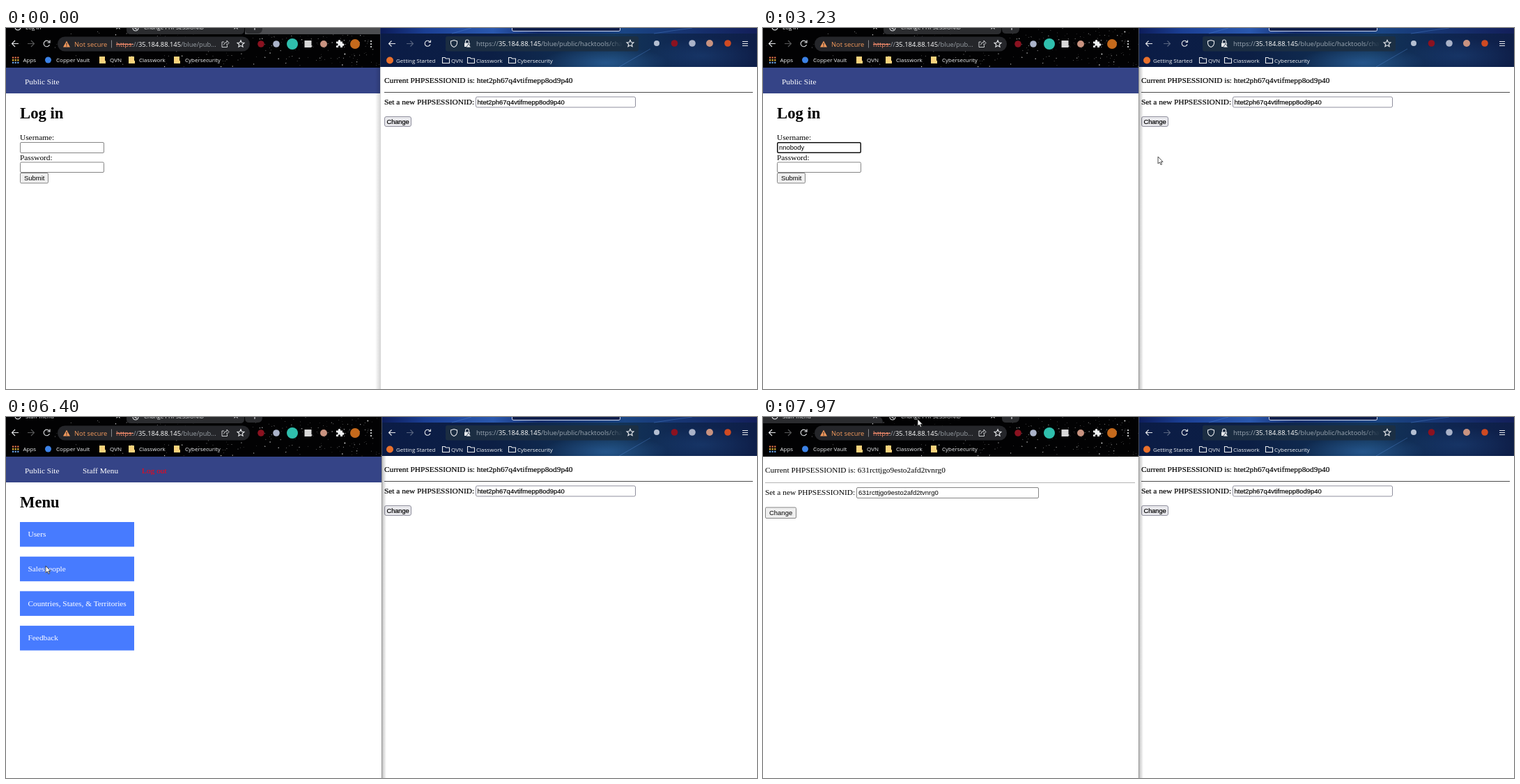
An HTML page for the animation above (8000 ms loop, 1078 by 519 pixels).

```html
<!DOCTYPE html>
<html lang="en">
<head>
<meta charset="utf-8">
<title>Session demo</title>
<style>
html, body { margin: 0; width: 100%; height: 100%; overflow: hidden; background: #fff; }
svg { display: block; width: 100vw; height: 100vh; }
text { white-space: pre; }
.ui { font: 8px "Open Sans", "Noto Sans", sans-serif; fill: #f1f3f4; }
.url { font-size: 9.4px; }
.page { font: 11.36px "Liberation Serif", serif; }
.h1 { font: bold 22.7px "Liberation Serif", serif; }
.form { font: 9.47px "Liberation Sans", sans-serif; }
.crisp { stroke: #000; stroke-width: .2; }
.line { fill: none; stroke: #e8eaed; stroke-width: 1.1; }
.box { fill: #fff; stroke: #858585; }
</style>
</head>
<body>
<svg viewBox="0 0 1078 519" preserveAspectRatio="none">
  <defs>
    <clipPath id="leftClip"><rect id="leftArea" width="537" height="519"/></clipPath>
    <clipPath id="rightHead"><rect x="537" width="541" height="56"/></clipPath>
    <linearGradient id="shade"><stop stop-color="#000" stop-opacity="0"/><stop offset="1" stop-color="#000" stop-opacity=".28"/></linearGradient>
    <linearGradient id="sky"><stop stop-color="#0b1c46"/><stop offset=".3" stop-color="#0c1f45"/><stop offset=".62" stop-color="#133558"/><stop offset=".8" stop-color="#0f2752"/><stop offset="1" stop-color="#0e1e48"/></linearGradient>
    <linearGradient id="strip"><stop stop-color="#0d1c58"/><stop offset=".12" stop-color="#1b3f94"/><stop offset=".3" stop-color="#2a58ae"/><stop offset=".42" stop-color="#142c6c"/><stop offset=".65" stop-color="#1a4584"/><stop offset="1" stop-color="#131f5a"/></linearGradient>
    <radialGradient id="glow"><stop stop-color="#3f86d8" stop-opacity=".4"/><stop offset="1" stop-color="#3f86d8" stop-opacity="0"/></radialGradient>
    <linearGradient id="fade" gradientUnits="userSpaceOnUse" x1="862" x2="885" y1="0" y2="0"><stop stop-color="#9aa6b2"/><stop offset="1" stop-color="#9aa6b2" stop-opacity="0"/></linearGradient>
  </defs>

  <g id="right">
    <rect x="537" width="541" height="519" fill="#fff"/>
    <g clip-path="url(#rightHead)">
      <rect x="537" width="541" height="56" fill="url(#sky)"/>
      <rect x="537" width="541" height="8" fill="url(#strip)"/>
      <ellipse cx="860" cy="50" rx="90" ry="24" fill="url(#glow)"/>
      <ellipse cx="1000" cy="40" rx="80" ry="26" fill="url(#glow)" opacity=".4"/>
      <path d="M640 8L668 0M930 8Q960 3 985 0M880 56L925 30" stroke="#5b8fe0" stroke-opacity=".35" fill="none"/>
    </g>
    <path d="M726.5 -1V3Q726.5 4.500 729 4.500H879Q881.500 4.500 881.500 3V-1" fill="#101f4c" stroke="#c9d4ee"/>
    <rect x="631" y="12" width="277" height="21.500" rx="3" fill="#1d2f43" fill-opacity=".92"/>
    <g class="line">
      <path d="M559 22.500H550M553.500 18.500L549.500 22.500L553.500 26.500"/>
      <path d="M575 22.500H584M580.500 18.500L584.500 22.500L580.500 26.500" opacity=".35"/>
      <path d="M608.500 20A4 4 0 1 0 609 23.500M609.500 17.500V20.500H606.500"/>
      <path d="M643 17.500L647.500 19V22Q647 26 643 27.500Q639 26 638.500 22V19Z"/>
      <path d="M659.500 21.500V19.500A2.500 2.500 0 0 1 664.500 19.500V21.500"/>
      <path d="M1057 19.500H1065M1057 22.500H1065M1057 25.500H1065"/>
    </g>
    <path d="M658 21.500H666V27H658Z" fill="#e8eaed"/>
    <path d="M664 22.500L667.500 28H660.500Z" fill="#e8eaed" stroke="#1d2f43" stroke-width=".8"/>
    <text class="ui url" x="675" y="26" style="fill:url(#fade)">https://<tspan fill="#fff">35.184.88.145</tspan>/blue/public/hacktools/cha</text>
    <g id="rightIcons"></g>
    <circle cx="551" cy="46.500" r="5" fill="#e8702c"/>
    <text class="ui" x="560" y="49.500">Getting Started</text>
    <text class="ui" x="639" y="49.500">QVN</text>
    <text class="ui" x="675" y="49.500">Classwork</text>
    <text class="ui" x="734" y="49.500">Cybersecurity</text>
    <text class="page crisp" x="543" y="79">Current PHPSESSIONID is: htet2ph67q4vtifmepp8od9p40</text>
    <path d="M543 92.500H1072" stroke="#4a4a4a"/>
    <text class="page crisp" x="543" y="110">Set a new PHPSESSIONID:</text>
    <rect x="674.500" y="99" width="229" height="15" rx="2" fill="#fff" stroke="#8f8f9d"/>
    <text class="form crisp" x="676.500" y="110">htet2ph67q4vtifmepp8od9p40</text>
    <rect x="543.500" y="127.500" width="38" height="14" rx="2.500" fill="#e9e9ed" stroke="#8f8f9d"/>
    <text class="form crisp" x="546.500" y="138.300" style="font-size:9.2px">Change</text>
  </g>

  <g clip-path="url(#leftClip)">
    <rect width="540" height="519" fill="#fff"/>
    <rect width="540" height="57" fill="#020203"/>
    <g id="stars" fill="#fff"></g>
    <rect id="idleStrip" x="343" width="197" height="9" fill="#4c4d50"/>
    <path id="tab1" d="M0 0H166Q172 0 172 9H0Z" fill="#2b2c2f"/>
    <path id="tab2" d="M173 0H342V3Q342 9 336 9H179Q173 9 173 3Z"/>
    <path d="M343 0H368V2Q367 8 361 8H349Q343 8 343 2Z" fill="#2b2c2f"/>
    <g class="line" stroke-width="1">
      <circle id="globe" cx="17" cy="-1" r="4"/>
      <path id="spinner" d="M13 -1A4 4 0 0 0 21 -1" style="stroke:#8ab4f8"/>
      <circle cx="186" cy="0" r="4"/>
      <path d="M183 -1L188 2M158.500 -4L163.500 1.500M163.500 -4L158.500 1.500M327.500 -4L332.500 1.500M332.500 -4L327.500 1.500M357 -4V3M353 -1H361"/>
    </g>
    <text class="ui" id="title" x="28" y="2"></text>
    <text class="ui" x="198" y="2">Change PHPSESSIONID</text>

    <rect x="74" y="12.500" width="276" height="21" rx="10.500" fill="#25262a"/>
    <g class="line">
      <path d="M18 22.500H9M13 18L8.500 22.500L13 27"/>
      <path d="M31 22.500H40M36 18L40.500 22.500L36 27" opacity=".38"/>
      <path d="M62 20A4.300 4.300 0 1 0 62.500 24M63 17.500V21H59.500"/>
      <path d="M313 20H310V27.500H317.500V25M312.500 24.500Q313 20.500 317 20.500V18L320 21.500L317 24.500V22.500" stroke-width="1" opacity=".85"/>
      <path d="M151.500 17.500V28.500" stroke-width="1" opacity=".5"/>
    </g>
    <path d="M87 18.500L92 27.500H82Z" fill="#f2995c"/>
    <path d="M87 21.500V24.500M87 25.300V26.400" stroke="#25262a" stroke-width="1.1"/>
    <text class="ui url" x="98" y="26.500" style="fill:#f2995c">Not secure</text>
    <text class="ui url" x="158" y="26.500" style="fill:#9aa0a6"><tspan fill="#f28b6b">https</tspan>://<tspan fill="#fff">35.184.88.145</tspan>/blue/pub...</text>
    <path d="M158 23.500H183" stroke="#f28b6b"/>
    <g id="leftIcons"></g>
    <path d="M474 19.500H477A1.700 1.700 0 1 1 480 19.500H483V22.500A1.700 1.700 0 1 1 483 25.500V28H479.700A1.600 1.600 0 1 0 477.300 28H474V25A1.600 1.600 0 1 0 474 22.500Z" fill="#f1f3f4"/>
    <text class="ui" x="24.500" y="48.500">Apps</text>
    <circle cx="60.500" cy="46" r="4.500" fill="#3c82e6"/>
    <text class="ui" x="72" y="48.500">Copper Vault</text>
    <text class="ui" x="149" y="48.500">QVN</text>
    <text class="ui" x="191" y="48.500">Classwork</text>
    <text class="ui" x="257" y="48.500">Cybersecurity</text>

    <g id="site">
      <rect y="57" width="540" height="37" fill="#354487"/>
      <text class="page" x="27" y="81" fill="#fff">Public Site</text>
      <g id="login">
        <text class="h1" x="20" y="130">Log in</text>
        <text class="page" x="20" y="161">Username:</text>
        <rect id="userBox" class="box" x="20.500" y="164.500" width="120" height="15" rx="1.500"/>
        <text class="form" id="user" x="23" y="174.500"></text>
        <text class="page" x="20" y="190">Password:</text>
        <rect id="passBox" class="box" x="20.500" y="193" width="120" height="14.500" rx="1.500"/>
        <g id="dots"></g>
        <path id="caret" stroke="#000"/>
        <rect id="submit" x="20.500" y="208.500" width="40" height="14.500" rx="1.500" stroke="#858585"/>
        <text class="form" x="26" y="219">Submit</text>
      </g>
      <g id="menu">
        <text class="page" x="110" y="81" fill="#fff">Staff Menu</text>
        <text class="page" x="195" y="81" fill="#ff0010">Log out</text>
        <text class="h1" x="20" y="130">Menu</text>
        <g id="items"></g>
      </g>
    </g>
    <g id="session">
      <text class="page" x="3" y="80">Current PHPSESSIONID is: 631rcttjgo9esto2afd2tvnrg0</text>
      <path d="M3 94.500H534" stroke="#b4b4b4"/>
      <text class="page" x="3" y="112">Set a new PHPSESSIONID:</text>
      <rect class="box" x="134.500" y="101.500" width="261" height="15" rx="1.500"/>
      <text class="form" x="137" y="112">631rcttjgo9esto2afd2tvnrg0</text>
      <rect x="3.500" y="130" width="44" height="15.500" rx="1.500" fill="#efefef" stroke="#858585"/>
      <text class="form" x="9" y="141">Change</text>
    </g>
  </g>

  <rect id="shadow" width="7" height="519" fill="url(#shade)"/>
  <path id="edge" d="M0 0V519" stroke="#777"/>
  <circle id="click" r="8.500" fill="#f5e61e" fill-opacity=".65"/>
  <g id="cursor">
    <path id="arrow" d="M0 0V10L2.300 8L4 11.600L5.600 10.900L4 7.400H7Z" fill="#fff" stroke="#222" stroke-width=".8"/>
    <path id="beam" d="M-2 -5.500H2M0 -5.500V5.500M-2 5.500H2" stroke="#222" fill="none"/>
    <path id="hand" d="M-1 1Q0 -.6 1 1V5L4 5.700Q5.500 6.200 5.200 8L4.400 13H-1L-3.600 8.700Q-3.900 7.300 -2.500 7.500L-1 8.500Z" fill="#fff" stroke="#222" stroke-width=".8"/>
  </g>
</svg>

<script>
const LOOP = 8000, STEP = 82;
const NS = "http://www.w3.org/2000/svg";
const $ = id => document.getElementById(id);

function add(parent, tag, attrs, text) {
  const el = document.createElementNS(NS, tag);
  for (const k in attrs) el.setAttribute(k, attrs[k]);
  if (text) el.textContent = text;
  $(parent).append(el);
  return el;
}
const show = (id, on) => $(id).style.display = on ? "" : "none";
const set = (id, attrs) => { for (const k in attrs) $(id).setAttribute(k, attrs[k]); };
const dot = (parent, cx, cy, r, fill) => add(parent, "circle", { cx, cy, r, fill });

function star(parent, cx, cy) {
  let d = "";
  for (let i = 0; i < 10; i++) {
    const a = i * Math.PI / 5 - Math.PI / 2, r = i % 2 ? 2.4 : 5.2;
    d += (i ? "L" : "M") + (cx + r * Math.cos(a)) + " " + (cy + r * Math.sin(a));
  }
  add(parent, "path", { d: d + "Z", class: "line" });
}

// Starry header, denser to the right
let seed = 11;
const rand = () => (seed = seed * 16807 % 2147483647) / 2147483647;
for (let i = 0; i < 240; i++) {
  const c = dot("stars", 540 * Math.sqrt(rand()), rand() * 56, .3 + rand() * rand() * .7, "#fff");
  c.setAttribute("opacity", .35 + rand() * .6);
}

// Toolbar icons
star("leftIcons", 337, 23);
[[366, 4.8, "#8b1220"], [388, 4.8, "#aab3c9"], [411, 8, "#2fbfad"], [456, 5, "#c99380"], [501, 7, "#c56a1c"]]
  .forEach(([x, r, c]) => dot("leftIcons", x, 23, r, c));
add("leftIcons", "rect", { x: 428.5, y: 18, width: 10, height: 10, fill: "#d8d8d8" });
for (let i = 0; i < 3; i++) dot("leftIcons", 524, 19 + i * 4, 1.1, "#f1f3f4");
const gridColors = ["#e8734a", "#e5b93c", "#6ba5e8"];
for (let i = 0; i < 9; i++)
  add("leftIcons", "rect", { x: 9 + i % 3 * 3.6, y: 41.5 + (i / 3 | 0) * 3.6, width: 2.2, height: 2.2, fill: gridColors[i / 3 | 0] });
for (const x of [134, 176, 241])
  add("leftIcons", "path", { d: `M${x} 41H${x + 8}V47H${x + 9}V51H${x}Z`, fill: "#f9d37c" });

star("rightIcons", 896, 22.5);
[[934, 4, "#b4bfd2"], [959.5, 4.8, "#8b1220"], [985, 4.8, "#aab3c9"], [1010, 5, "#c99380"], [1036, 4.8, "#cf4a22"]]
  .forEach(([x, r, c]) => dot("rightIcons", x, 22, r, c));
for (const x of [626.5, 662.5, 721.5])
  add("rightIcons", "path", { d: `M${x} 42.500H${x + 3.5}L${x + 5} 44H${x + 10}V50.500H${x}Z`, class: "line" });

// Menu buttons and password bullets
const items = ["Users", "Salespeople", "Countries, States, & Territories", "Feedback"].map((label, i) => {
  const y = 151 + i * 49.7;
  const el = add("items", "rect", { x: 20, y, width: 164, height: 35.5 });
  add("items", "text", { x: 31.5, y: y + 21.2, class: "page", fill: "#fff" }, label);
  return { el, y };
});
const dots = Array.from({ length: 12 }, (_, i) => dot("dots", 24.6 + i * 3.4, 200, 1.25, "#111"));

// Pointer keys: time, x, y; a null position hides the pointer until the next key
const path = [
  [0, null], [80, 954, 512], [320, 560, 345], [570, 230, 200], [810, 112, 160], [890, 105, 170], [1140, 105, 170],
  [1220, null], [3070, 1050, 1], [3230, 567, 185], [3480, 230, 198], [3810, 75, 200], [4150, 74, 200],
  [4640, 46, 226], [5040, 37, 222], [5810, 37, 222], [6400, 57, 214], [6640, 57, 214], [6890, 151, 160],
  [7100, 180, 120], [7400, 222, 38], [7640, 222, 3], [8000, 222, 3]
];
function pointer(t) {
  let i = 0;
  while (i < path.length - 2 && path[i + 1][0] <= t) i++;
  const [t0, x0, y0] = path[i], [t1, x1, y1] = path[i + 1];
  if (x0 === null) return null;
  if (x1 === null) return { x: x0, y: y0 };
  const k = Math.floor((t - t0 + 2) / STEP) * STEP / (t1 - t0);
  return { x: x0 + (x1 - x0) * k, y: y0 + (y1 - y0) * k };
}

const NAME = "nnobody";
const keyTimes = [1990, 2070, 2240, 2320, 2490, 2570, 2650];
const inside = (p, x, y, w, h) => p && p.x >= x && p.x <= x + w && p.y >= y && p.y <= y + h;
const between = (t, a, b) => t >= a && t < b;

function focusBox(id, y, h, on) {
  set(id, on
    ? { x: 20.75, y: y + .25, width: 119.5, height: h - .5, style: "stroke:#101010;stroke-width:1.5" }
    : { x: 20.5, y, width: 120, height: h, style: "" });
}

function draw(t) {
  const p = pointer(t);
  const front = t >= 1140;
  const onMenu = between(t, 5810, 7890), onLogin = t < 5810, onSession = t >= 7890;

  // Window stacking
  set("leftArea", { width: front ? 539 : 537 });
  set("shadow", { transform: front ? "translate(546 0) scale(-1 1)" : "translate(530 0)", y: front ? 56 : 57, opacity: front ? 1 : .55 });
  set("edge", { transform: `translate(${front ? 539.5 : 537.5} 0)`, "stroke-opacity": front ? .6 : .3 });
  show("idleStrip", !front);

  show("site", !onSession);
  show("login", onLogin);
  show("menu", onMenu);
  show("session", onSession);
  $("title").textContent = onLogin ? "Log in" : "Staff menu";
  const loading = between(t, 5390, 5810);
  show("globe", !loading);
  show("spinner", loading);
  show("tab1", onSession);
  set("tab2", { fill: onSession ? "#020203" : t >= 7560 ? "#3a3b3f" : "#2b2c2f" });

  // Form
  const typed = keyTimes.filter(k => t >= k).length;
  const userFocus = between(t, 890, 3900), passFocus = between(t, 3900, 5210);
  $("user").textContent = NAME.slice(0, typed);
  focusBox("userBox", 164.5, 15, userFocus);
  focusBox("passBox", 193, 14.5, passFocus);
  const bullets = t < 4150 ? 0 : Math.min(12, Math.floor((t - 4150) / 80) + 1);
  dots.forEach((d, i) => d.style.display = i < bullets ? "" : "none");
  const userCaret = between(t, 1140, 1720) || between(t, 1990, 3150);
  show("caret", userCaret || passFocus);
  const caretX = passFocus ? 23.5 + bullets * 3.4 : Math.round(23 + (typed ? $("user").getComputedTextLength() : 0)) + .5;
  set("caret", { d: passFocus ? `M${caretX} 194.500V205.500` : `M${caretX} 166V177` });
  set("submit", { fill: between(t, 5210, 5390) ? "#f5f5f5" : inside(p, 20, 208, 41, 15) ? "#e5e5e5" : "#efefef" });

  // Menu hover
  let hot = false;
  for (const { el, y } of items) {
    const over = between(t, 6640, 7890) && inside(p, 20, y, 164, 35.5);
    hot = hot || over;
    el.setAttribute("fill", over ? "#3f6fe1" : "#477bff");
  }

  // Pointer
  show("cursor", p);
  show("click", p && (between(t, 890, 980) || between(t, 3900, 3980) || between(t, 5210, 5390)));
  if (!p) return;
  const beam = onLogin && (inside(p, 20, 164, 121, 16) || inside(p, 20, 193, 121, 15));
  show("beam", beam);
  show("hand", hot);
  show("arrow", !beam && !hot);
  set("cursor", { transform: `translate(${p.x} ${p.y})` });
  set("click", { cx: p.x, cy: p.y + 1 });
}

const start = performance.now();
function tick() {
  draw((performance.now() - start) % LOOP);
  requestAnimationFrame(tick);
}
tick();
</script>
</body>
</html>
```
